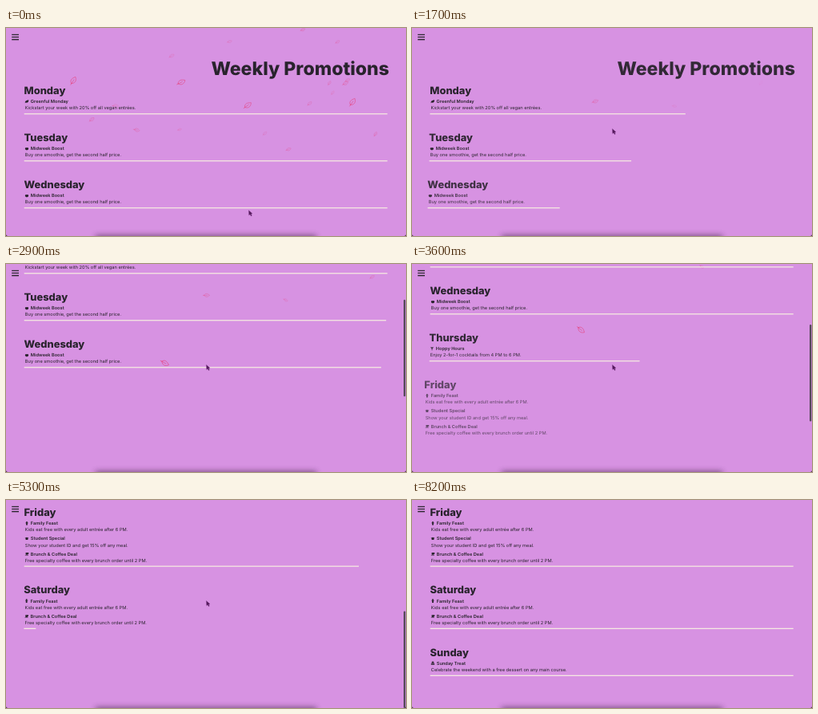
Write an HTML page that moves like this. It is 500 by 261 pixels and loops after 8.3 s.

```html
<!DOCTYPE html>
<html lang="en">
<head>
<meta charset="utf-8">
<title>Weekly Promotions</title>
<style>
html, body { margin: 0; width: 100%; height: 100%; overflow: hidden; background: #d792e2; }
svg { display: block; width: 100vw; height: 100vh; }
text { font-family: Inter, "Open Sans", sans-serif; fill: #29232d; text-rendering: geometricPrecision; }
.title { font-size: 23.1px; font-weight: 800; text-anchor: end; }
.day { font-size: 12.9px; font-weight: 800; }
.deal { font-size: 5.65px; font-weight: 600; }
.info { font-size: 5.7px; }
.leaf { fill: none; stroke: #e8386f; stroke-width: .7; stroke-linecap: round; stroke-linejoin: round; }
</style>
</head>
<body>
<svg id="stage" viewBox="0 0 500 261" preserveAspectRatio="none">
  <defs>
    <filter id="blur" x="-10%" y="-200%" width="120%" height="500%"><feGaussianBlur stdDeviation="3.5"/></filter>
    <clipPath id="hero"><rect width="500" height="261"/></clipPath>
  </defs>
  <rect width="500" height="261" fill="#d792e2"/>
  <g id="page">
    <g id="leaves" clip-path="url(#hero)"></g>
    <text id="title" class="title" x="479" y="58.8">Weekly Promotions</text>
  </g>
  <rect x="112" y="260" width="276" height="12" fill="#3b2140" opacity=".6" filter="url(#blur)"/>
  <path d="M0 258.5Q0 261 2.5 261H0ZM500 258.5Q500 261 497.5 261H500Z" fill="#2a1a2e"/>
  <path d="M7.2 8.3h8.8M7.2 11.4h8.8M7.2 14.5h8.8" stroke="#2f2833" stroke-width="1.3"/>
  <rect id="bar" x="497" width="2.3" height="121.5" rx="1.1" fill="#55495a"/>
  <path id="cursor" d="M0 0L.3 6.2L1.7 5L2.8 7.2L3.9 6.6L2.9 4.5L4.6 4.2Z" fill="#54185c" stroke="#7a3a84" stroke-width=".3"/>
</svg>
<script>
const LOOP = 8300, STEP = 100, RELOAD = 700, MAX_SCROLL = 299;
const RULE_WIDTH = 454, RULE_TIME = 2000, SLIDE = 13, SLIDE_TIME = 1000;
const $ = id => document.getElementById(id);
const clamp = v => Math.max(0, Math.min(1, v));
const page = $("page");

function add(parent, tag, attrs, text) {
  const el = document.createElementNS("http://www.w3.org/2000/svg", tag);
  set(el, attrs);
  if (text) el.textContent = text;
  return parent.appendChild(el);
}

function set(el, attrs) {
  for (const k in attrs) el.setAttribute(k, attrs[k]);
}

// cubic-bezier(.25, .1, .25, 1)
function ease(x) {
  if (x <= 0) return 0;
  if (x >= 1) return 1;
  const curve = (s, a, b) => 3 * s * (1 - s) * (1 - s) * a + 3 * s * s * (1 - s) * b + s * s * s;
  let lo = 0, hi = 1;
  for (let i = 0; i < 24; i++) {
    const mid = (lo + hi) / 2;
    if (curve(mid, .25, .25) < x) lo = mid; else hi = mid;
  }
  return curve(lo, .1, 1);
}

function track(keys, t) {
  const i = keys.findIndex(k => t < k[0]);
  if (i < 0) return keys[keys.length - 1][1];
  if (i === 0) return keys[0][1];
  const [a, va] = keys[i - 1], [b, vb] = keys[i];
  return va + (vb - va) * (t - a) / (b - a);
}

let seed = 11;
function random(lo, hi) {
  seed = (seed * 16807) % 2147483647;
  return lo + (hi - lo) * seed / 2147483647;
}

// tiny icons, centred on 0,0
const ICONS = {
  leaf: "M-2.2 2Q-2.6 -1.5 2.3 -1.9Q2.4 2.2 -1.2 1.4Z",
  apple: "M0 -1Q2.2 -1.8 2.2 .3Q1.8 2.3 0 2Q-1.8 2.3 -2.2 .3Q-2.2 -1.8 0 -1Z",
  glass: "M-2.2 -1.8H2.2L.4 .1V2H-.4V.1Z",
  child: "M-.8 -2.3H.8V-.8H1.6V0H.9V2.3H-.9V0H-1.6V-.8H-.8Z",
  cap: "M-2.5 -.6L0 -1.7L2.5 -.6L1.5 -.1V1.3Q0 2 -1.5 1.3V-.1Z",
  cup: "M-2 -1.6H2.3V.1H1.4V1.1H-1.4V-1.6ZM-2.2 1.5H2V2H-2.2Z",
  treat: "M-1.6 0Q-1.5 -2.2 0 -2.2Q1.5 -2.2 1.6 0ZM-2.2 .4H2.2V2H-2.2Z"
};

const boost = ["apple", "Midweek Boost", "Buy one smoothie, get the second half price."];
const feast = ["child", "Family Feast", "Kids eat free with every adult entrée after 6 PM."];
const brunch = ["cup", "Brunch & Coffee Deal", "Free specialty coffee with every brunch order until 2 PM."];
const green = ["leaf", "Greenful Monday", "Kickstart your week with 20% off all vegan entrées."];
const hoppy = ["glass", "Hoppy Hours", "Enjoy 2-for-1 cocktails from 4 PM to 6 PM."];
const student = ["cap", "Student Special", "Show your student ID and get 15% off any meal."];
const treat = ["treat", "Sunday Treat", "Celebrate the weekend with a free dessert on any main course."];

// start: text slides in; wait: delay of the rule below it
const days = [
  { name: "Monday", start: 870, wait: 0, deals: [green] },
  { name: "Tuesday", start: 1055, wait: 0, deals: [boost] },
  { name: "Wednesday", start: 1240, wait: 0, deals: [boost] },
  { name: "Thursday", start: 2930, wait: 0, deals: [hoppy] },
  { name: "Friday", start: 3330, wait: 650, deals: [feast, student, brunch] },
  { name: "Saturday", start: 4500, wait: 700, deals: [feast, brunch] },
  { name: "Sunday", start: 5320, wait: 350, deals: [treat] }
];

const ROW = 19.2;
let y = 83;
for (const day of days) {
  day.box = add(page, "g", {});
  day.words = add(day.box, "g", {});
  add(day.words, "text", { class: "day", x: 22.5, y }, day.name);
  for (const [icon, deal, info] of day.deals) {
    add(day.words, "path", { d: ICONS[icon], fill: "#29232d", transform: `translate(26 ${y + 9.2})` });
    add(day.words, "text", { class: "deal", x: 30.8, y: y + 11.1 }, deal);
    add(day.words, "text", { class: "info", x: 23.8, y: y + 19.4 }, info);
    y += ROW;
  }
  day.rule = add(day.box, "rect", { x: 22.7, y: y + 4.9, height: 1.3, fill: "#f6e8e2" });
  y += 59 - ROW;
}

function makeLeaf(x, y, size, alpha, birth) {
  const el = add($("leaves"), "path", { class: "leaf", d: "M-4 3C-5 -2 -1 -4 5 -4C5 2 1 5 -4 3M-5.5 4.5L1.5 -1" });
  return { el, x, y, size, alpha, birth, turn: random(-20, 50) };
}

// before the reload: a few large leaves among scattered small ones
const oldLeaves = [[84, 66], [219, 68], [302, 97], [433, 93]].map(([x, y]) => makeLeaf(x, y, .85, .8));
for (let i = 0; i < 16; i++) {
  oldLeaves.push(makeLeaf(random(100, 480), random(0, 160), random(.4, .6), random(.35, .6)));
}
// after it: leaves that fade in one by one
const newLeaves = [[229, 92, .6], [328, 98, .45], [436, 69, .5], [177, 177, .85]]
  .map(([x, y, size], i) => makeLeaf(x, y, size, size, 1000 + 300 * i));

function drawLeaf(leaf, dt, alpha) {
  const x = leaf.x + .018 * dt, y = leaf.y + .036 * dt;
  set(leaf.el, {
    transform: `translate(${x} ${y}) rotate(${leaf.turn + dt * .015}) scale(${leaf.size})`,
    opacity: alpha
  });
}

const scrollKeys = [[2200, 0], [2900, 96], [3600, 163], [4500, 232], [5200, MAX_SCROLL]];

function draw(t) {
  const fresh = t >= RELOAD;
  const scroll = track(scrollKeys, t);
  set(page, { transform: `translate(0 ${-scroll})` });
  set($("title"), { opacity: fresh ? ease((t - RELOAD) / 1400) : 1 });

  days.forEach((day, i) => {
    const done = !fresh && i < 3;
    const shown = done ? 1 : ease((t - day.start) / SLIDE_TIME);
    const grown = done ? 1 : ease((t - day.start - day.wait) / RULE_TIME);
    set(day.box, { transform: `translate(${SLIDE * (shown - 1)} 0)` });
    set(day.words, { opacity: Math.sqrt(shown) });
    set(day.rule, { width: RULE_WIDTH * grown });
  });

  for (const leaf of oldLeaves) drawLeaf(leaf, t, fresh ? 0 : leaf.alpha);
  for (const leaf of newLeaves) drawLeaf(leaf, t - 1700, leaf.alpha * clamp((t - leaf.birth) / 800));

  set($("bar"), {
    y: scroll * 139.5 / MAX_SCROLL,
    opacity: clamp((t - 2150) / 100) * clamp((7000 - t) / 300)
  });

  const move = ease((t - 300) / 1100);
  set($("cursor"), {
    transform: `translate(${303.4 - 53 * move} ${228.8 - 102.4 * move})`,
    opacity: t < 7600 ? 1 : 0
  });
}

const begin = performance.now();
function tick() {
  const t = (performance.now() - begin) % LOOP;
  draw(Math.floor(t / STEP) * STEP);
  requestAnimationFrame(tick);
}
tick();
</script>
</body>
</html>
```
